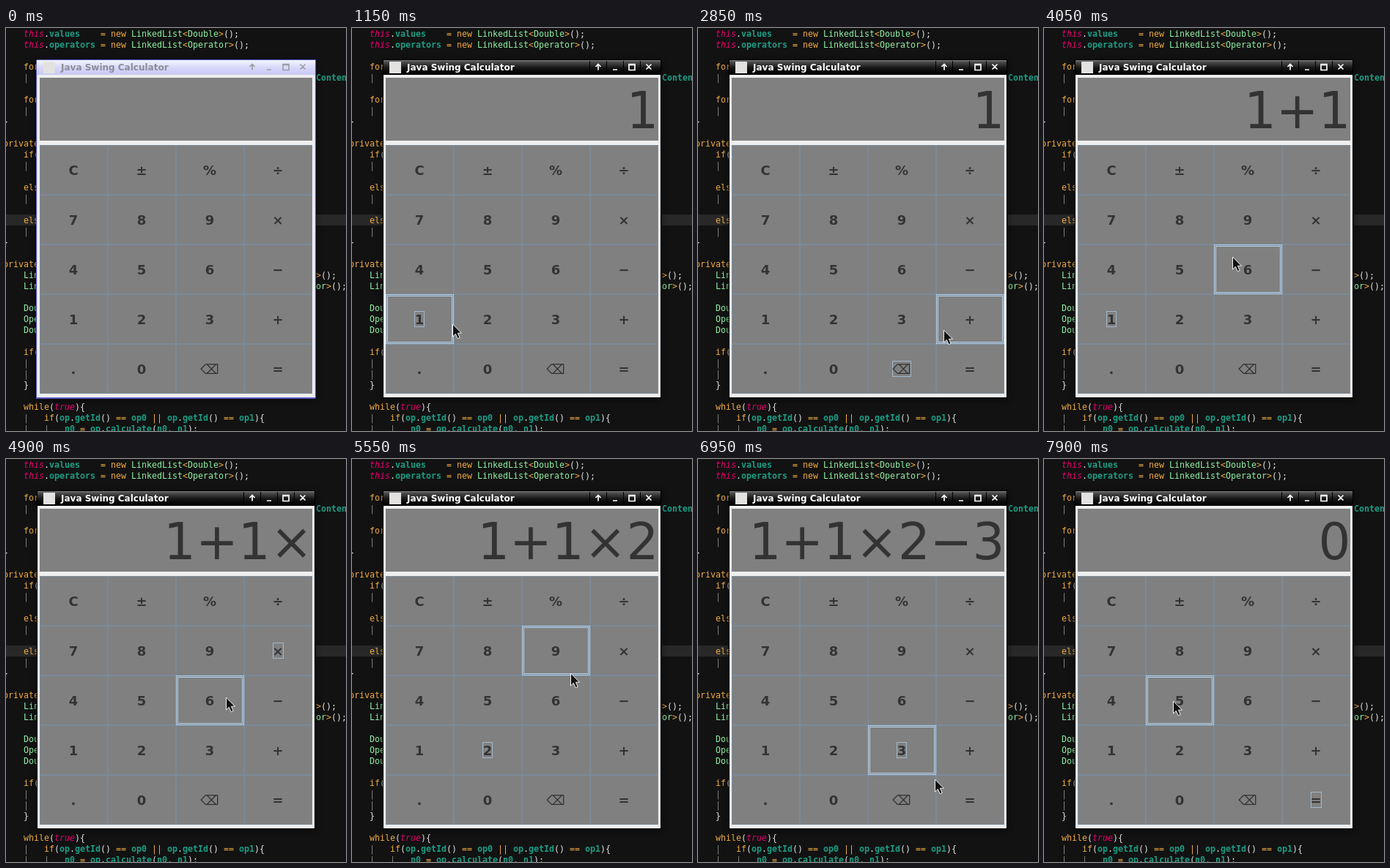
Animation of 464x551 px, one loop 8 s. Source, as an HTML page:

```html
<!DOCTYPE html>
<html lang="en">
<head>
<meta charset="utf-8">
<title>Calculator</title>
<style>
html, body { margin: 0; width: 100%; height: 100%; overflow: hidden; background: #121212; }
svg { display: block; }
text { white-space: pre; }
rect { shape-rendering: crispEdges; }
.code { font: 11.63px "DejaVu Sans Mono", monospace; fill: #e4e4e4; }
.self { fill: #e6006e; font-style: italic; }
.word { fill: #f0ab43; }
.type { fill: #8ff0a4; }
.name { fill: #1a9e85; font-weight: bold; }
.bar { fill: #808080; }
.title { font: bold 12px "DejaVu Sans", sans-serif; }
.keys text { font: bold 18px "DejaVu Sans", sans-serif; fill: #333; text-anchor: middle; }
.keys text.thin { font-weight: normal; }
#display { font: 69px "DejaVu Sans", sans-serif; fill: #333; text-anchor: end; }
</style>
</head>
<body>
<svg id="stage" width="464" height="551" viewBox="0 0 464 551">
  <defs>
    <linearGradient id="dim" x2="0" y2="1">
      <stop stop-color="#f4f4ff"/><stop offset=".5" stop-color="#d8d8fa"/><stop offset="1" stop-color="#c8c8f4"/>
    </linearGradient>
    <linearGradient id="lit" x2="0" y2="1">
      <stop stop-color="#8a8a8a"/><stop offset=".1" stop-color="#505050"/><stop offset=".55" stop-color="#161616"/><stop offset="1" stop-color="#000"/>
    </linearGradient>
    <filter id="soft"><feGaussianBlur stdDeviation="5"/></filter>
  </defs>
  <rect y="255" width="464" height="15" fill="#282828"/>
  <g id="code" class="code"></g>
  <rect x="42" y="46" width="380" height="462" opacity=".6" filter="url(#soft)"/>
  <g id="idle">
    <rect x="41" y="43" width="382" height="464" rx="2" fill="#5a5ac8"/>
    <rect x="42" y="44" width="380" height="461" fill="#dcdcff"/>
    <rect x="42" y="44" width="380" height="20" fill="url(#dim)"/>
  </g>
  <g id="active">
    <rect x="42" y="43" width="380" height="463"/>
    <rect x="43" y="44" width="378" height="19" fill="url(#lit)"/>
    <path d="M324.500 45v18m23 0v-18m23 0v18m23 0v-18" stroke="#000"/>
  </g>
  <rect x="43" y="64" width="378" height="441" fill="#eee"/>
  <rect x="51" y="46" width="16" height="16" fill="#e4e2e0"/>
  <g id="caption">
    <text class="title" x="75" y="58">Java Swing Calculator</text>
    <path id="icons" d="M336 57.500V50M332.500 53L336 49.500L339.500 53M356 57h6M378 49.500h8v8h-8zM378 50.500h8M401.500 49.500l7 7M408.500 49.500l-7 7" fill="none" stroke-width="1.700"/>
  </g>
  <rect x="46" y="68" width="372" height="86" fill="#808080"/>
  <text id="display" x="418.500" y="136.500"></text>
  <g id="keys" class="keys"></g>
  <path id="pointer" d="M.5 1V18L4.300 14.300L7.200 20.700L10.200 19.400L7.400 13.200H12.500z" fill="#111" stroke="#f4f4f4"/>
</svg>
<script>
const NS = 'http://www.w3.org/2000/svg';
const $ = id => document.getElementById(id);
const KEYS = 'C±%÷789×456−123+.0⌫=';
const LOOP = 8000, GLIDE = 300, KEY_W = 93, KEY_H = 68;

// a tab jumps past the window to column 61
const CODE = `|   this.values    = new LinkedList<Double>();
|   this.operators = new LinkedList<Operator>();

|   for
|   |\tContent

|   for
|   |
}

private
|   if(
|   |

|   else
|   |

|   else
|   |
}

private
|   LinkedList\t>();
|   LinkedList\tor>();

|   Double
|   Operator
|   Double

|   if(
|   |
|   |
|   }

|   while(true){
|   |   if(op.getId() == op0 || op.getId() == op1){
|   |   |   n0 = op.calculate(n0, n1);`;

// arrival time and place; each glide lasts GLIDE ms at most
const PATH = [
  [500, 66, 470], [1150, 137, 404], [1850, 350, 400], [2450, 285, 480],
  [2850, 335, 412], [2950, 365, 384], [3250, 306, 402], [3800, 100, 400],
  [4050, 257, 312], [4500, 375, 268], [4900, 300, 325], [5300, 190, 390],
  [5550, 298, 292], [5950, 367, 310], [6550, 296, 388], [6950, 323, 437],
  [7150, 365, 462], [7900, 176, 330]
];

// release time, key, how long it is seen held down
const CLICKS = [
  [1050, '1'], [1900, '+'], [2600, '⌫'], [3100, '+'], [3850, '1'],
  [4650, '×'], [5550, '2', 250], [6250, '−'], [6700, '3'], [7500, '=', 150]
];

function add(parent, tag, attrs, text = '') {
  const el = document.createElementNS(NS, tag);
  for (const k in attrs) el.setAttribute(k, attrs[k]);
  el.textContent = text;
  return parent.appendChild(el);
}

function outline(parent, x, y, width, height, stroke) {
  return add(parent, 'rect', { x: x + .5, y: y + .5, width: width - 1, height: height - 1, fill: 'none', stroke });
}

function kind(token) {
  if (token === '|') return 'bar';
  if (/^(this|true)$/.test(token)) return 'self';
  if (/^(new|for|if|else|while|private|[=|<>]+)$/.test(token)) return 'word';
  if (/^([A-Z]|or$)/.test(token) && token !== 'Content') return 'type';
  return /\w/.test(token) ? 'name' : '';
}

function writeCode() {
  CODE.split('\n').forEach((row, i) => {
    const text = row.replace(/(.*)\t/, (_, head) => head.padEnd(61));
    const line = add($('code'), 'text', { x: -4, y: 12 + 15 * i });
    for (const token of text.match(/\w+|\|+|[=<>]+|[^\w|=<>]+/g) || [])
      add(line, 'tspan', { class: kind(token) }, token);
  });
}

function makeKey(label, i) {
  const x = 46 + i % 4 * KEY_W, y = 160 + KEY_H * Math.floor(i / 4);
  const g = add($('keys'), 'g', {});
  const face = add(g, 'rect', { x, y, width: KEY_W, height: KEY_H, fill: '#808080' });
  outline(g, x, y, KEY_W, KEY_H, '#7a8a99');
  const hover = add(g, 'g', {});
  ['#b8cfe5', '#7a8a99', '#b8cfe5'].forEach((c, d) => outline(hover, x + d, y + d, KEY_W - 2 * d, KEY_H - 2 * d, c));
  const wide = label === '⌫';
  const w = wide ? 26 : /\d/.test(label) ? 14 : 15;
  const focus = outline(g, x + Math.ceil(46 - w / 2), y + 23, w, 22, '#a3b8cc');
  add(g, 'text', { x: x + 46, y: y + 40.5, class: wide ? 'thin' : '' }, label);
  return { label, x, y, face, hover, focus };
}

const show = (el, on) => el.setAttribute('visibility', on ? 'visible' : 'hidden');

function pointerAt(t) {
  if (t < PATH[0][0]) return null;
  const i = PATH.findIndex(p => p[0] > t);
  if (i < 0) return PATH.at(-1).slice(1);
  const [left, x0, y0] = PATH[i - 1], [end, x1, y1] = PATH[i];
  const start = Math.max(left, end - GLIDE);
  const p = Math.max(0, (t - start) / (end - start));
  return [x0 + (x1 - x0) * p, y0 + (y1 - y0) * p].map(Math.round);
}

function type(text, key) {
  if (key === '⌫') return text.slice(0, -1);
  return key === '=' ? '0' : text + key;
}

writeCode();
const keys = [...KEYS].map(makeKey);

function draw(t) {
  const at = pointerAt(t - t % 50);
  const text = CLICKS.filter(c => c[0] <= t).reduce((s, c) => type(s, c[1]), '');
  const [up, focused] = CLICKS.findLast(([time, , hold = 0]) => time - hold <= t) || [0, ''];
  show($('idle'), !at);
  show($('active'), at);
  show($('pointer'), at);
  $('caption').setAttribute('fill', at ? '#fff' : '#8c8c96');
  $('icons').setAttribute('stroke', at ? '#fff' : '#9c9ca6');
  if (at) $('pointer').setAttribute('transform', `translate(${at})`);
  $('display').textContent = text;
  for (const k of keys) {
    const down = t < up && k.label === focused;
    // the hot spot sits a little above the arrow's tip
    const over = at && at[0] >= k.x && at[0] < k.x + KEY_W && at[1] - 6 >= k.y && at[1] - 6 < k.y + KEY_H;
    k.face.setAttribute('fill', down ? '#b8cfe5' : '#808080');
    show(k.hover, over && !down);
    show(k.focus, k.label === focused);
  }
}

const begin = performance.now();
function tick() {
  draw((performance.now() - begin) % LOOP);
  requestAnimationFrame(tick);
}
tick();
</script>
</body>
</html>
```
